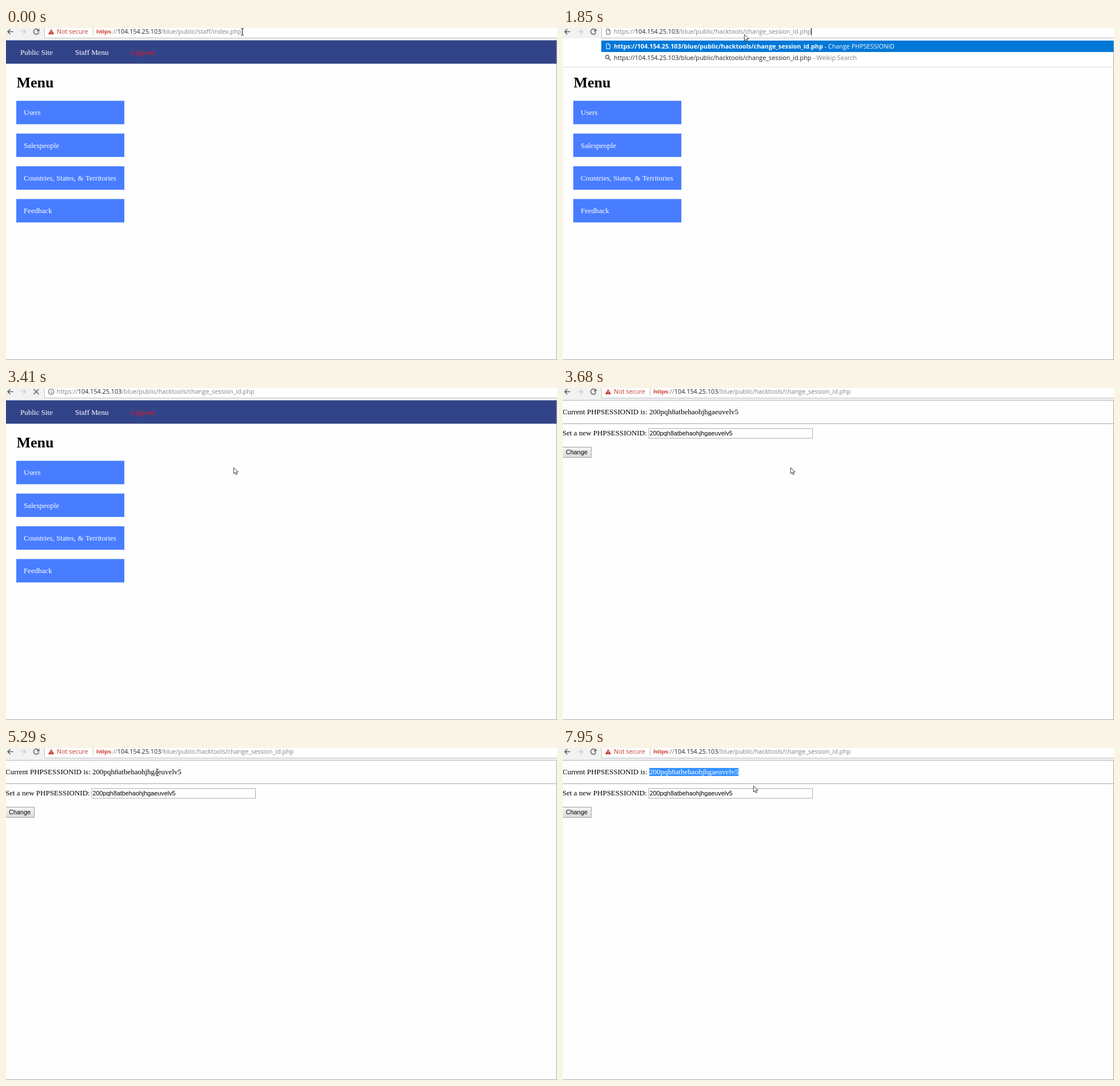
Recreate the animation shown at these times as an HTML page with a canvas. Size 964 px wide and 581 px high, loop 8000 ms.

```html
<!DOCTYPE html>
<html lang="en">
<head>
<meta charset="utf-8">
<title>Session ID demo</title>
<style>
html, body { margin: 0; width: 100%; height: 100%; overflow: hidden; background: #fefefe; }
canvas { display: block; }
</style>
</head>
<body>
<canvas id="stage" width="964" height="581"></canvas>
<script>
const ctx = document.getElementById('stage').getContext('2d');
const LOOP = 8000;
const UI = '10.8px "Open Sans", sans-serif';
const UI_BOLD = 'bold ' + UI;
const SERIF = '13px "Liberation Serif", serif';
const HEADING = 'bold 26px "Liberation Serif", serif';
const FORM = '10.83px "Liberation Sans", sans-serif';
const RED = '#c5392c', GRAY = '#808080', DARK = '#222', ICON = '#5a5a5a', BLUE = '#0078d7';
const HOST = '104.154.25.103';
const MENU_PATH = '/blue/public/staff/index.php';
const TOOL_PATH = '/blue/public/hacktools/change_session_id.php';
const TOKEN = '200pqh8atbehaohjhgaeuvelv5';

// Each move: first step time, last step time, number of steps, end values.
const pointerMoves = [
  [150, 700, 5, 302, 6],
  [1110, 1230, 2, 317, 11],
  [2090, 2510, 4, 398, 139],
  [4080, 4340, 3, 371, 139],
  [4470, 4600, 2, 359, 113],
  [4750, 5160, 4, 264, 42],
  [5300, 5580, 3, 305, 42],
  [5990, 6290, 3, 209, 42],
  [6410, 6840, 4, 154, 42],
  [7270, 7950, 6, 333, 66]
];
const urlSelection = [[150, 700, 5, 22]];
const tokenSelection = [[5990, 6290, 3, 14], [6410, 6840, 4, 26]];

function track(t, start, moves) {
  let now = start;
  for (const [from, to, steps, ...end] of moves) {
    if (t < from) break;
    const step = Math.floor((t - from) / (to - from) * (steps - 1) + 1e-6) + 1;
    const p = Math.min(1, step / steps);
    now = now.map((v, i) => v + (end[i] - v) * p);
  }
  return now;
}

function rect(x, y, w, h, color) {
  ctx.fillStyle = color;
  ctx.fillRect(x, y, w, h);
}

function text(str, x, y, font, color) {
  ctx.font = font;
  ctx.fillStyle = color;
  ctx.fillText(str, x, y);
  return x + ctx.measureText(str).width;
}

function runs(x, y, ...parts) {
  for (const [str, color, font = UI] of parts) x = text(str, x, y, font, color);
  return x;
}

function path(d, x, y, stroke, width = 1, fill) {
  const shape = new Path2D(d);
  ctx.save();
  ctx.translate(x, y);
  if (fill) { ctx.fillStyle = fill; ctx.fill(shape); }
  if (stroke) { ctx.strokeStyle = stroke; ctx.lineWidth = width; ctx.stroke(shape); }
  ctx.restore();
}

// Highlights the last `count` characters of a line that ends at `right`.
function select(str, count, right, baseline, top, height, font, color) {
  if (!count) return;
  const part = str.slice(-count);
  ctx.font = font;
  const x = right - ctx.measureText(part).width;
  rect(x, top, right - x, height, color);
  text(part, x, baseline, font, '#fff');
}

function pageIcon(x, y, color) {
  path('M-3-4.5H1L3.2-2.3V4.5H-3ZM1-4.5V-2.3H3.2', x, y, color);
}

function toolbar(t) {
  const editing = t >= 1850 && t < 3410;
  const loading = t >= 3410 && t < 3680;
  rect(0, 0, 964, 21, '#f2f2f2');
  rect(67, 0, 897, 17, '#fff');
  rect(67, 0, 1, 17, '#c4c4c4');
  rect(67, 17, 897, 1, '#bdbdbd');
  const arrow = 'M-5 0H5M0-4.5L-4.5 0L0 4.5';
  path(arrow, 7.5, 6.5, ICON, 1.5);
  ctx.save();
  ctx.scale(-1, 1);
  path(arrow, -30, 6.5, '#d0d0d0', 1.5);
  ctx.restore();
  if (loading) {
    path('M-4.5-4.5L4.5 4.5M4.5-4.5L-4.5 4.5', 53, 6.5, ICON, 1.5);
  } else {
    path('M3.3-3.3A4.6 4.6 0 1 0 4.5 1', 53, 6.5, ICON, 1.5);
    path('M5.4-5.5V-.6H.5Z', 53, 6.5, null, 0, ICON);
  }

  if (editing || loading) {
    if (editing) pageIcon(79, 6.5, ICON);
    else path('M-4.8 0A4.8 4.8 0 1 0 4.8 0A4.8 4.8 0 1 0-4.8 0M0-.8V3M0-3V-1.8', 79, 6.5, ICON, 1.1);
    runs(89, 10, ['https://', GRAY], [HOST, DARK], [TOOL_PATH, GRAY]);
    if (editing && (t < 2370 || t >= 2890)) rect(434, 0, 1, 13, '#000');
    return;
  }
  path('M0-5L5.2 4.5H-5.2Z', 79, 6.5, null, 0, RED);
  path('M0-1.8V1.3M0 2.2V3.3', 79, 6.5, '#fff', 1.1);
  text('Not secure', 89, 10, UI, RED);
  rect(152, 0, 1, 13, '#c0c0c0');
  const schemeEnd = text('https', 158, 10, UI, RED);
  rect(158, 6.5, schemeEnd - 158, 1, RED);
  const url = t < 1850 ? MENU_PATH : TOOL_PATH;
  const end = runs(schemeEnd, 10, ['://', GRAY], [HOST, DARK], [url, GRAY]);
  if (t < 1850) {
    const count = Math.round(track(t, [0], urlSelection)[0]);
    select(url, count, end, 10, 0, 13, UI, BLUE);
  }
}

function menuPage() {
  rect(0, 21.5, 964, 41, '#324488');
  text('Public Site', 25, 47, SERIF, '#fff');
  text('Staff Menu', 121, 47, SERIF, '#fff');
  text('Log out', 219, 47, SERIF, '#f5101e');
  text('Menu', 18.5, 104, HEADING, '#000');
  ['Users', 'Salespeople', 'Countries, States, & Territories', 'Feedback'].forEach((label, i) => {
    const y = 127.4 + 57.3 * i;
    rect(18, y, 189, 41, '#487dff');
    text(label, 31, y + 25, SERIF, '#fff');
  });
}

function suggestions() {
  rect(0, 18, 964, 50, '#fff');
  rect(0, 68, 964, 1, '#dcdcdc');
  rect(67, 22, 897, 20, BLUE);
  pageIcon(79, 32, '#fff');
  runs(89, 36, ['https://' + HOST + TOOL_PATH, '#fff', UI_BOLD], [' - Change PHPSESSIONID', '#fff']);
  path('M-4-1.2A3 3 0 1 0 2-1.2A3 3 0 1 0-4-1.2M1.2 1L5 4.8', 78.5, 52, ICON, 1.4);
  runs(89, 56.3, ['https://' + HOST + TOOL_PATH, DARK], [' - Welkip Search', GRAY]);
}

function sessionPage(t) {
  rect(0, 21, 964, 1, '#b4b4b4');
  const end = text('Current PHPSESSIONID is: ' + TOKEN, -1, 46, SERIF, '#000');
  const count = Math.round(track(t, [0], tokenSelection)[0]);
  select(TOKEN, count, end, 46, 35, 14, SERIF, '#3390ff');
  rect(0, 62, 964, 1, '#a8a8a8');
  text('Set a new PHPSESSIONID:', -1, 83, SERIF, '#000');
  rect(149.5, 70.5, 287.5, 18, '#a9a9a9');
  rect(150.5, 71.5, 285.5, 16, '#fff');
  text(TOKEN, 151.5, 83, FORM, '#000');
  rect(0, 103, 50, 19, '#a0a0a0');
  const face = ctx.createLinearGradient(0, 104, 0, 121);
  face.addColorStop(0, '#f4f4f4');
  face.addColorStop(1, '#dcdcdc');
  rect(0, 104, 49, 17, face);
  text('Change', 5, 116, FORM, '#000');
}

function pointer(t) {
  const [x, y] = track(t, [413, 6], pointerMoves);
  const overText = y > 35 && y < 49 && x < 308;
  const overInput = y > 71 && y < 88 && x > 150 && x < 437;
  const beam = t < 1110 || (t >= 3680 && t < 7270 && (overText || overInput));
  if (beam) path('M-2.5-5.5H-.5L0-5L.5-5.5H2.5M0-5V5.5M-2.5 6H-.5L0 5.5L.5 6H2.5', x + .5, y + .5, '#111');
  else path('M0 0V10.8L2.5 8.5L4.2 12.3L6 11.5L4.3 7.8H7.7Z', x + .3, y + .3, '#222', .9, '#fff');
}

function draw(t) {
  rect(0, 0, 964, 581, '#fefefe');
  if (t < 3680) menuPage();
  toolbar(t);
  if (t >= 3680) sessionPage(t);
  if (t >= 1850 && t < 3410) suggestions();
  rect(963, 22, 1, 559, '#a9a9a9');
  rect(0, 580, 964, 1, '#a9a9a9');
  pointer(t);
}

const began = performance.now();
function tick() {
  draw((performance.now() - began) % LOOP);
  requestAnimationFrame(tick);
}
tick();
</script>
</body>
</html>
```
